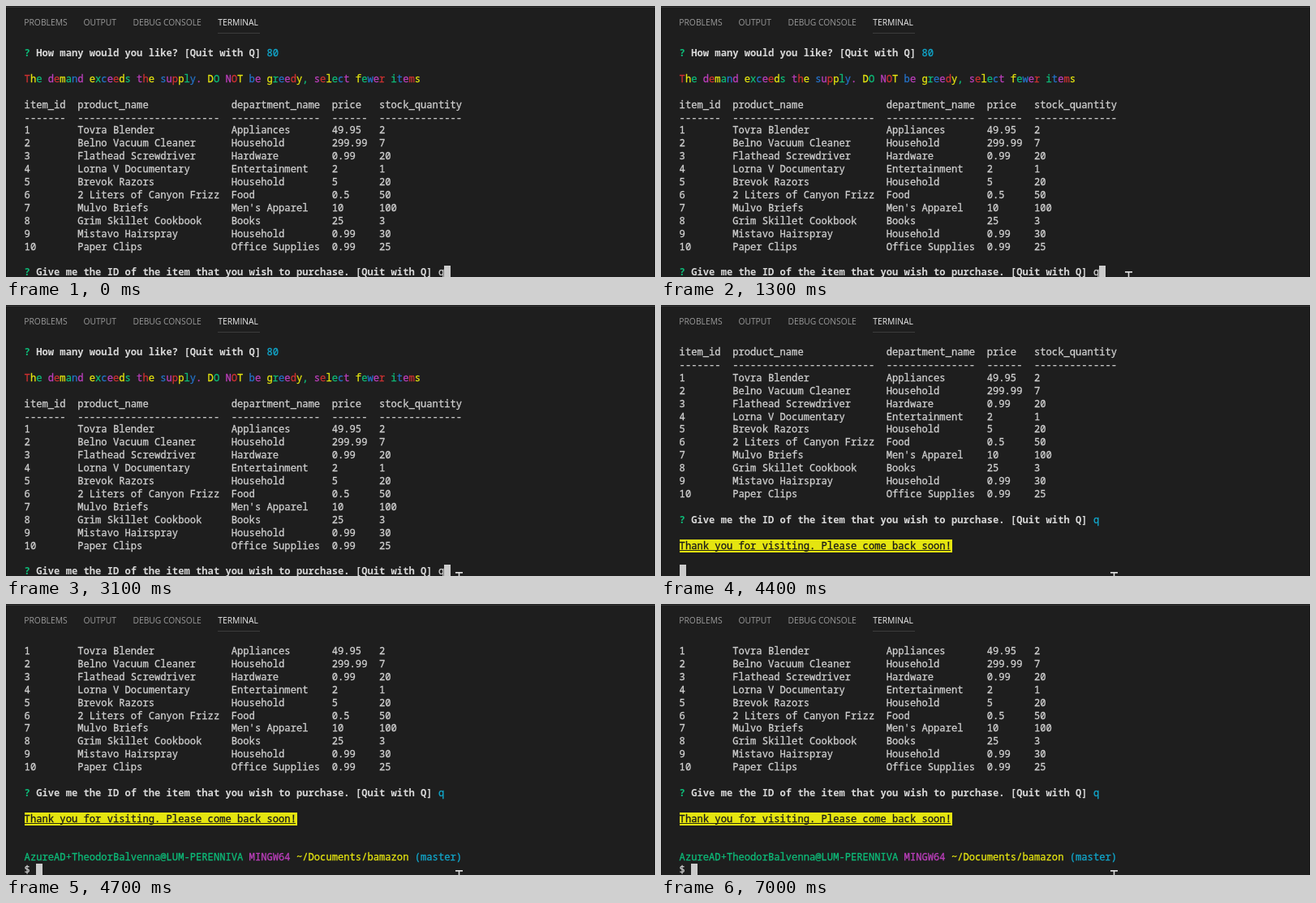
Recreate the animation shown at these times as an HTML page with a canvas. Size 800 px wide and 334 px high, loop 7100 ms.

```html
<!DOCTYPE html>
<html lang="en">
<head>
<meta charset="utf-8">
<title>Terminal store</title>
<style>
  html, body { margin: 0; width: 100%; height: 100%; overflow: hidden; background: #1e1e1e; }
  canvas { display: block; width: 100vw; height: 100vh; }
</style>
</head>
<body>
<canvas id="stage" width="800" height="334"></canvas>
<script>
const ctx = document.getElementById('stage').getContext('2d');

const LOOP = 7100, QUIT_AT = 4400, EXIT_AT = 4600;
const LEFT = 22.6, CELL = 7.29, PITCH = 15.9, BASE = 62, LAST_ROW = 17;
const MONO = '12.13px "Noto Sans Mono", "DejaVu Sans Mono", monospace';
const C = {
  bg: '#1e1e1e', text: '#d0d0d0', white: '#d8d8d8', red: '#cd3131', green: '#0dbc79',
  yellow: '#e5e510', blue: '#2472c8', magenta: '#bc3fbc', cyan: '#11a8cd'
};
const RAINBOW = [C.red, C.yellow, C.green, C.blue, C.magenta];

const WARNING = 'The demand exceeds the supply. DO NOT be greedy, select fewer items';
const THANKS = 'Thank you for visiting. Please come back soon!';
const ASK = 'Give me the ID of the item that you wish to purchase. [Quit with Q]';

const WIDTHS = [7, 24, 15, 6, 14];
const HEADS = ['item_id', 'product_name', 'department_name', 'price', 'stock_quantity'];
const ITEMS = [
  ['Tovra Blender', 'Appliances', 49.95, 2],
  ['Belno Vacuum Cleaner', 'Household', 299.99, 7],
  ['Flathead Screwdriver', 'Hardware', 0.99, 20],
  ['Lorna V Documentary', 'Entertainment', 2, 1],
  ['Brevok Razors', 'Household', 5, 20],
  ['2 Liters of Canyon Frizz', 'Food', 0.5, 50],
  ['Mulvo Briefs', "Men's Apparel", 10, 100],
  ['Grim Skillet Cookbook', 'Books', 25, 3],
  ['Mistavo Hairspray', 'Household', 0.99, 30],
  ['Paper Clips', 'Office Supplies', 0.99, 25]
];

const tableRow = cells => cells.map((c, i) => String(c).padEnd(WIDTHS[i])).join('  ');
const baseline = row => BASE + row * PITCH;
const cellX = col => LEFT + col * CELL;

function rect(x, y, w, h, color) {
  ctx.fillStyle = color;
  ctx.fillRect(x, y, w, h);
}

// Terminal text: one glyph per cell; color may be a function of the index.
function put(row, col, text, color = C.text, bold = false) {
  ctx.font = (bold ? '600 ' : '') + MONO;
  ctx.lineWidth = 0.3;
  const y = baseline(row);
  [...text].forEach((ch, i) => {
    if (ch === ' ') return;
    ctx.fillStyle = ctx.strokeStyle = typeof color === 'function' ? color(i) : color;
    ctx.fillText(ch, cellX(col + i), y);
    if (!bold) ctx.strokeText(ch, cellX(col + i), y);
  });
  return col + text.length;
}

function fillCells(row, col, count, color) {
  rect(Math.round(cellX(col)), Math.round(baseline(row) - 12), Math.ceil(count * CELL), 16, color);
}

function question(row, text, answer, color) {
  put(row, 0, '?', C.green, true);
  const end = put(row, 2, text, C.white, true);
  return put(row, end + 1, answer, color);
}

function panel() {
  rect(0, 0, 800, 334, C.bg);
  rect(0, 1, 800, 1, '#343434');
  rect(0, 2, 1, 332, '#131313');
  rect(799, 2, 1, 332, '#131313');
  ctx.font = '10.3px "Open Sans", "Noto Sans", sans-serif';
  [['PROBLEMS', 22.3], ['OUTPUT', 95.4], ['DEBUG CONSOLE', 156.4], ['TERMINAL', 261.3]].forEach(([name, x], i) => {
    ctx.fillStyle = i === 3 ? '#ececec' : '#9a9a9a';
    ctx.fillText(name, x, 24);
  });
  rect(261, 33, 52, 1, '#3c3c3c');
}

function screen(t) {
  const quit = t >= QUIT_AT, exited = t >= EXIT_AT;
  const top = exited ? -6 : quit ? -4 : 0;
  const visible = (row, draw) => { if (row + top >= 0) draw(row + top); };

  visible(0, r => question(r, 'How many would you like? [Quit with Q]', '80', C.cyan));
  visible(2, r => put(r, 0, WARNING, i => RAINBOW[i % RAINBOW.length]));
  visible(4, r => put(r, 0, tableRow(HEADS)));
  visible(5, r => put(r, 0, tableRow(WIDTHS.map(w => '-'.repeat(w)))));
  ITEMS.forEach((item, i) => visible(6 + i, r => put(r, 0, tableRow([i + 1, ...item]))));

  let cursor = question(LAST_ROW + top, ASK, 'q', quit ? C.cyan : C.text);
  if (quit) {
    const row = 19 + top;
    fillCells(row, 0, THANKS.length, C.yellow);
    put(row, 0, THANKS, '#1a1a1a');
    rect(LEFT, Math.round(baseline(row)) + 1, THANKS.length * CELL - 1, 1, '#2a2a12');
    cursor = 0;
  }
  if (exited) {
    const row = LAST_ROW - 1;
    let col = put(row, 0, 'AzureAD+TheodorBalvenna@LUM-PERENNIVA', C.green);
    col = put(row, col + 1, 'MINGW64', C.magenta);
    col = put(row, col + 1, '~/Documents/bamazon', C.yellow);
    put(row, col + 1, '(master)', C.cyan);
    cursor = put(LAST_ROW, 0, '$') + 1;
  }
  fillCells(LAST_ROW, cursor, 1, '#cccccc');
}

// Pointer path: time, x, top edge.
const PATH = [
  [400, 776, 336], [600, 752, 316], [700, 732, 308], [800, 646, 316], [1000, 596, 324],
  [1600, 557, 330], [2300, 557, 330], [2400, 558, 329], [4400, 558, 329], [4500, 558, 328]
];

function pointerAt(t) {
  const next = PATH.findIndex(p => p[0] > t);
  if (next < 0) return PATH[PATH.length - 1].slice(1);
  if (next === 0) return null;
  const a = PATH[next - 1], b = PATH[next];
  const k = (t - a[0]) / (b[0] - a[0]);
  return [a[1] + (b[1] - a[1]) * k, a[2] + (b[2] - a[2]) * k];
}

function pointer(t) {
  const at = pointerAt(t);
  if (!at) return;
  const x = Math.round(at[0]), y = Math.round(at[1]);
  rect(x - 4, y, 9, 1.7, '#dedede');
  rect(x - 0.3, y, 1.6, 17, '#dedede');
  rect(x - 4, y + 15.3, 9, 1.7, '#dedede');
}

const start = performance.now();

function frame() {
  const t = (performance.now() - start) % LOOP;
  panel();
  screen(t);
  pointer(t);
  requestAnimationFrame(frame);
}

frame();
</script>
</body>
</html>
```
